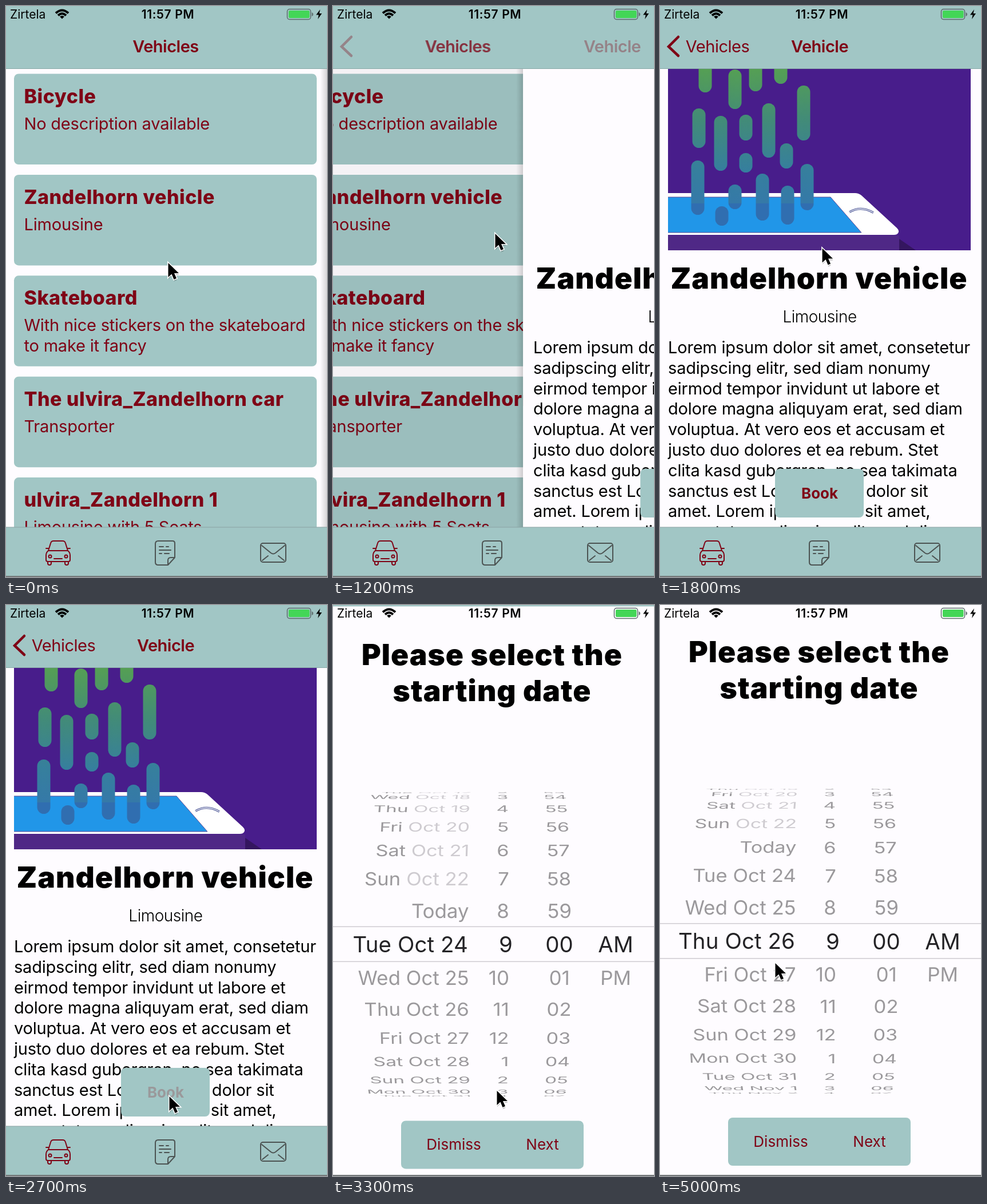
Recreate the animation shown at these times as an HTML page. Size 561x998 px, loop 5.1 s.

```html
<!DOCTYPE html>
<html lang="en">
<head>
<meta charset="utf-8">
<title>Vehicle booking</title>
<style>
html, body { margin: 0; width: 100%; height: 100%; overflow: hidden; background: #fefcff; }
svg { display: block; width: 561px; height: 998px; }
text { font: 400 29px Inter, Roboto, sans-serif; letter-spacing: -.007em; white-space: pre; }
.teal { fill: #a1c6c5; }
.red { fill: #7f0416; }
.paper { fill: #fefcff; }
.mid { text-anchor: middle; }
.end { text-anchor: end; }
.nav { letter-spacing: -.017em; }
.semi { font-weight: 600; }
.small { font-size: 21px; letter-spacing: 0; }
.clock { letter-spacing: .03em; }
.head { font-size: 34px; font-weight: 800; letter-spacing: .014em; }
.big { font-size: 51.5px; font-weight: 900; letter-spacing: .02em; }
.light { font-size: 28px; font-weight: 300; letter-spacing: -.017em; }
.btn { font-size: 26px; letter-spacing: 0; }
.book { font-weight: 700; }
.row { font-size: 35px; fill: #9b999c; letter-spacing: 0; }
.sel { font-size: 38.5px; fill: #242326; letter-spacing: .002em; }
.past { fill: #cecbd0; }
.line { fill: none; stroke-width: 2; stroke-linejoin: round; stroke-linecap: round; }
.thin { stroke-width: 1.2; }
.bold { stroke-width: 4.5; stroke-linejoin: miter; }
</style>
</head>
<body>
<svg viewBox="0 0 561 998">
  <defs>
    <linearGradient id="drop" gradientUnits="userSpaceOnUse" x1="0" y1="110" x2="0" y2="380">
      <stop offset="0" stop-color="#559f54"/>
      <stop offset=".33" stop-color="#428b78"/>
      <stop offset=".65" stop-color="#367f9d"/>
      <stop offset=".87" stop-color="#3579a8"/>
      <stop offset=".87" stop-color="#306eb0"/>
      <stop offset="1" stop-color="#306eb0"/>
    </linearGradient>
    <linearGradient id="edge">
      <stop offset="0" stop-opacity="0"/>
      <stop offset="1" stop-opacity=".16"/>
    </linearGradient>
    <clipPath id="photoBox"><path d="M14 100H543V427H14z"/></clipPath>
    <clipPath id="band"><path d="M-4 558H561V617H-4z"/></clipPath>
    <clipPath id="offBand"><path d="M-4 318H561V557H-4zM-4 618H561V857H-4z"/></clipPath>
  </defs>

  <rect class="paper" width="561" height="998"/>
  <g id="list"></g>
  <rect id="dim" width="561" height="998"/>

  <g id="page">
    <rect x="-16" y="110" width="12" height="801" fill="url(#edge)"/>
    <rect class="paper" x="-4" y="100" width="570" height="820"/>
    <g id="photo" clip-path="url(#photoBox)">
      <path fill="#481d8b" d="M14 100H543V427H14z"/>
      <path fill="#4f2886" d="M14 401H418V427H14z"/>
      <path fill="#34165f" d="M418 407L447 427H418z"/>
      <path fill="#fff" d="M14 327H341Q347 327 352 331L414 388Q419 393 416 397Q414 400 409 400H14z"/>
      <path fill="#2196e8" stroke="#5b4a97" d="M10 334H298L352 396H10z"/>
      <path class="line thin" stroke="#3f4a8f" d="M331 359Q351 347 373 360M332 361Q351 350 372 362"/>
      <g id="drops" stroke="url(#drop)" stroke-width="23" stroke-linecap="round"></g>
    </g>
    <text class="big mid" x="278" y="494">Zandelhorn vehicle</text>
    <text class="light mid" x="279" y="553">Limousine</text>
    <g id="lorem"></g>
    <rect class="teal" x="201" y="809" width="155" height="85" rx="8"/>
    <text id="book" class="btn book mid" x="279" y="861">Book</text>
  </g>

  <rect class="teal" width="561" height="110"/>
  <path fill="#89a9a8" d="M0 109H561V110H0z"/>
  <text id="oldTitle" class="nav red semi mid" y="81">Vehicles</text>
  <text id="backLabel" class="nav red mid" y="81">Vehicles</text>
  <text id="newTitle" class="nav red semi mid" y="81">Vehicle</text>
  <path id="chevron" class="line bold" stroke="#7f0416" d="M32 54L15 71L32 87"/>

  <rect class="teal" y="911" width="561" height="87"/>
  <path fill="#8ba3a3" d="M0 910.5H561V911.5H0z"/>
  <g class="line" stroke="#7f0416">
    <path d="M74 952L78 939Q79 935 83 935H99Q103 935 104 939L108 952M74 952H108Q112 955 112 960V968Q112 971 109 971H73Q70 971 70 968V960Q70 955 74 952M73 971V974Q73 977 76 977T79 974V971M103 971V974Q103 977 106 977T109 974V971M74 948H70M108 948H112M84 966H98"/>
    <circle cx="77" cy="962" r="2.5"/><circle cx="105" cy="962" r="2.5"/>
  </g>
  <g class="line" stroke="#4c5352">
    <path d="M266 935H291Q295 935 295 939V964L283 977H266Q261 977 261 972V940Q261 935 266 935zM283 977V969Q283 964 288 964H295M268 945H275M280 945H284M268 951H288M268 957H272M277 957H285"/>
    <rect x="445" y="939" width="44" height="33" rx="4"/>
    <path d="M447 943L463 956Q467 959 471 956L487 943M448 969L458 961M486 969L476 961"/>
  </g>

  <g id="modal">
    <rect class="paper" x="-4" y="-3" width="570" height="1010"/>
    <text class="big mid" x="278" y="100">Please select the</text>
    <text class="big mid" x="278" y="163">starting date</text>
    <g id="wheel" clip-path="url(#offBand)"></g>
    <g id="center" clip-path="url(#band)"></g>
    <path fill="#cfccd1" d="M0 556H561V557.5H0zM0 617H561V618.5H0z"/>
    <rect class="teal" x="119" y="896" width="319" height="84" rx="8"/>
    <text class="btn red mid" x="211" y="947">Dismiss</text>
    <text class="btn red mid" x="366" y="947">Next</text>
  </g>

  <text class="small" x="7" y="22">Zirtela</text>
  <g fill="none" stroke="#000" stroke-width="4">
    <path d="M87 12.5Q98 2.5 109 12.5M91 16.5Q98 10 105 16.5"/>
    <path d="M94 18.5Q98 15.5 102 18.5L98 22.5z" fill="#000" stroke="none"/>
  </g>
  <text class="small clock semi mid" x="283" y="22">11:57 PM</text>
  <rect x="491.5" y="5.5" width="41" height="18" rx="4" fill="none" stroke="#5c6b6b" stroke-width="1.5"/>
  <rect x="494" y="8" width="36.5" height="13" rx="2" fill="#43d657"/>
  <path fill="#5c6b6b" d="M534.5 11Q537 12 537 14.5T534.5 18z"/>
  <path d="M549 6L542 15.5H546.5L545 23L552 13H547.5z"/>
  <path fill="#737879" d="M0 996H561V998H0z"/>

  <g id="cursor">
    <path d="M2 5V30L8 24.5L12 34L16.5 32L12.5 23H20.5z" opacity=".25"/>
    <path d="M1.5 2V27L7.500 21.500L11.500 31L16 29L12 20H20z" stroke="#fff" stroke-width="3" paint-order="stroke"/>
  </g>
</svg>
<script>
const $ = id => document.getElementById(id);
const LOOP = 5100, STEP = 100;

// Static content
const cards = [
  ['Bicycle', 'No description available'],
  ['Zandelhorn vehicle', 'Limousine'],
  ['Skateboard', 'With nice stickers on the skateboard', 'to make it fancy'],
  ['The ulvira_Zandelhorn car', 'Transporter'],
  ['ulvira_Zandelhorn 1', 'Limousine with 5 Seats']
];
$('list').innerHTML = cards.map(([title, ...lines], i) => {
  const y = 118.5 + i * 176.4;
  return `<rect class="teal" x="14" y="${y}" width="529" height="158.5" rx="8"/>
    <text class="head red" x="31.5" y="${y + 51}">${title}</text>` +
    lines.map((s, n) => `<text class="red" x="31.5" y="${y + 97 + n * 35.5}">${s}</text>`).join('');
}).join('');

const lorem = `Lorem ipsum dolor sit amet, consetetur
sadipscing elitr, sed diam nonumy
eirmod tempor invidunt ut labore et
dolore magna aliquyam erat, sed diam
voluptua. At vero eos et accusam et
justo duo dolores et ea rebum. Stet
clita kasd gubergren, no sea takimata
sanctus est Lorem ipsum dolor sit
amet. Lorem ipsum dolor sit amet,
consetetur sadipscing elitr, sed diam`;
$('lorem').innerHTML = lorem.split('\n')
  .map((s, i) => `<text x="14" y="${607 + i * 35.8}">${s}</text>`).join('');

// Falling pills: x, top, bottom
$('drops').innerHTML = [
  [79, 90, 151], [131, 111, 180], [167, 90, 149], [211, 90, 136], [251, 139, 235], [68, 179, 248],
  [106, 192, 288], [150, 190, 235], [190, 170, 265], [150, 257, 291], [221, 240, 284], [66, 270, 365],
  [257, 276, 357], [131, 312, 355], [179, 293, 375], [223, 314, 382], [108, 350, 384]
].map(([x, a, b]) => `<path d="M${x} ${a + 11.5}V${b - 11.5}"/>`).join('');

// Picker wheel
const PIVOT = 285, MIDDLE = 587.5, RADIUS = 277, ANGLE = 12.2 * Math.PI / 180;
const days = 'Sun Mon Tue Wed Thu Fri Sat'.split(' ');

function dateLabel(i) {
  if (i === -1) return 'Today';
  const d = new Date(2017, 9, 24 + i);
  const rest = `${d.getMonth() === 9 ? 'Oct' : 'Nov'} ${d.getDate()}`;
  return `${days[d.getDay()]} ` + (i < -1 ? `<tspan class="past">${rest}</tspan>` : rest);
}
const columns = [
  { from: -7, to: 9, x: 237.5, selX: 236, mid: -130, align: 'end', label: dateLabel, moves: true },
  { from: -7, to: 7, x: 308, selX: 314, mid: 10, align: 'end', label: i => (i + 20) % 12 + 1 },
  { from: -7, to: 7, x: 396, selX: 395.5, mid: 110, align: 'mid', label: i => String((i + 60) % 60).padStart(2, '0') },
  { from: 0, to: 1, x: 494.5, selX: 494, mid: 209, align: 'mid', label: i => i ? 'PM' : 'AM' }
];
const rows = [];

function addText(parent, cls, x, y, label) {
  const el = document.createElementNS('http://www.w3.org/2000/svg', 'text');
  el.setAttribute('class', cls);
  el.setAttribute('x', x);
  el.setAttribute('y', y);
  el.innerHTML = label;
  return parent.appendChild(el);
}
for (const col of columns) {
  for (let i = col.from; i <= col.to; i++) {
    const label = col.label(i);
    rows.push({
      col, i,
      off: addText($('wheel'), 'row ' + col.align, col.x - PIVOT, 12.7, label),
      sel: addText($('center'), 'sel ' + col.align, col.selX - PIVOT, 14, label)
    });
  }
}

function turnWheel(pos) {
  for (const { col, i, off, sel } of rows) {
    const k = i - (col.moves ? pos : 0);
    const a = k * ANGLE, sin = Math.sin(a), cos = Math.cos(a);
    const y = RADIUS * sin * (1 - .0426 * (1 - cos));
    const s = 1 - .095 * (1 - cos);
    off.style.display = cos > .02 ? '' : 'none';
    off.setAttribute('transform', `matrix(${s} 0 ${-col.mid * .00034 * sin} ${s * cos} ${PIVOT} ${MIDDLE + y})`);
    sel.style.display = Math.abs(k) < 1.2 ? '' : 'none';
    sel.setAttribute('transform', `matrix(1 0 0 ${cos} ${PIVOT} ${MIDDLE + y * 1.1})`);
  }
}

// Motion helpers
function spring(t, start, speed) { // share of the way still to go
  const u = Math.max(0, t - start) / 1000 * speed;
  return (1 + u) * Math.exp(-u);
}
function track(t, keys, n = 1) {
  const j = keys.findIndex(k => k[0] > t);
  if (j < 0) return keys[keys.length - 1][n];
  if (j === 0) return keys[0][n];
  const a = keys[j - 1], b = keys[j], p = (t - a[0]) / (b[0] - a[0]);
  return a[n] + (b[n] - a[n]) * p * p * (3 - 2 * p);
}
const pointer = [
  [200, 282, 447], [700, 282, 396], [1700, 282, 396], [2400, 284, 857], [3000, 284, 857],
  [3200, 285, 847], [3500, 285, 847], [3850, 175, 634], [4200, 171, 571], [4350, 199, 678], [4600, 200, 624]
];
const dial = [[3850, 0], [4200, 1.06], [4300, 1], [4350, 1], [4600, 1.86], [4700, 1.86], [5000, 2.015]];

const shift = (id, x, y = 0) => $(id).setAttribute('transform', `translate(${x} ${y})`);

function render(t) {
  const page = spring(t, 1126, 18.8);
  shift('list', -169.5 * (1 - page));
  shift('page', 565 * page);
  $('dim').setAttribute('opacity', .1 * (1 - page));
  $('photo').style.display = t >= 1300 ? '' : 'none';
  $('book').setAttribute('fill', t >= 2500 && t < 2850 ? '#9a999b' : '#7f0416');

  const nav = spring(t, 1146, 22.4);
  const back = 100.5 + 178.5 * nav;
  for (const [id, x, opacity] of [
    ['oldTitle', back, nav], ['backLabel', back, 1 - nav],
    ['newTitle', 279 + 317 * nav, 1 - nav], ['chevron', 0, 1 - nav]
  ]) {
    shift(id, x);
    $(id).setAttribute('opacity', opacity);
  }

  shift('modal', 0, 1003 * spring(t, 2910, 18.8));
  turnWheel(track(t, dial));
  shift('cursor', track(t, pointer), track(t, pointer, 2));
}

// The picture advances in steps of 100 ms
const start = performance.now() - 15;
let last = -1;
function tick() {
  const t = Math.floor((performance.now() - start) % LOOP / STEP) * STEP;
  if (t !== last) render(last = t);
  requestAnimationFrame(tick);
}
tick();
</script>
</body>
</html>
```
